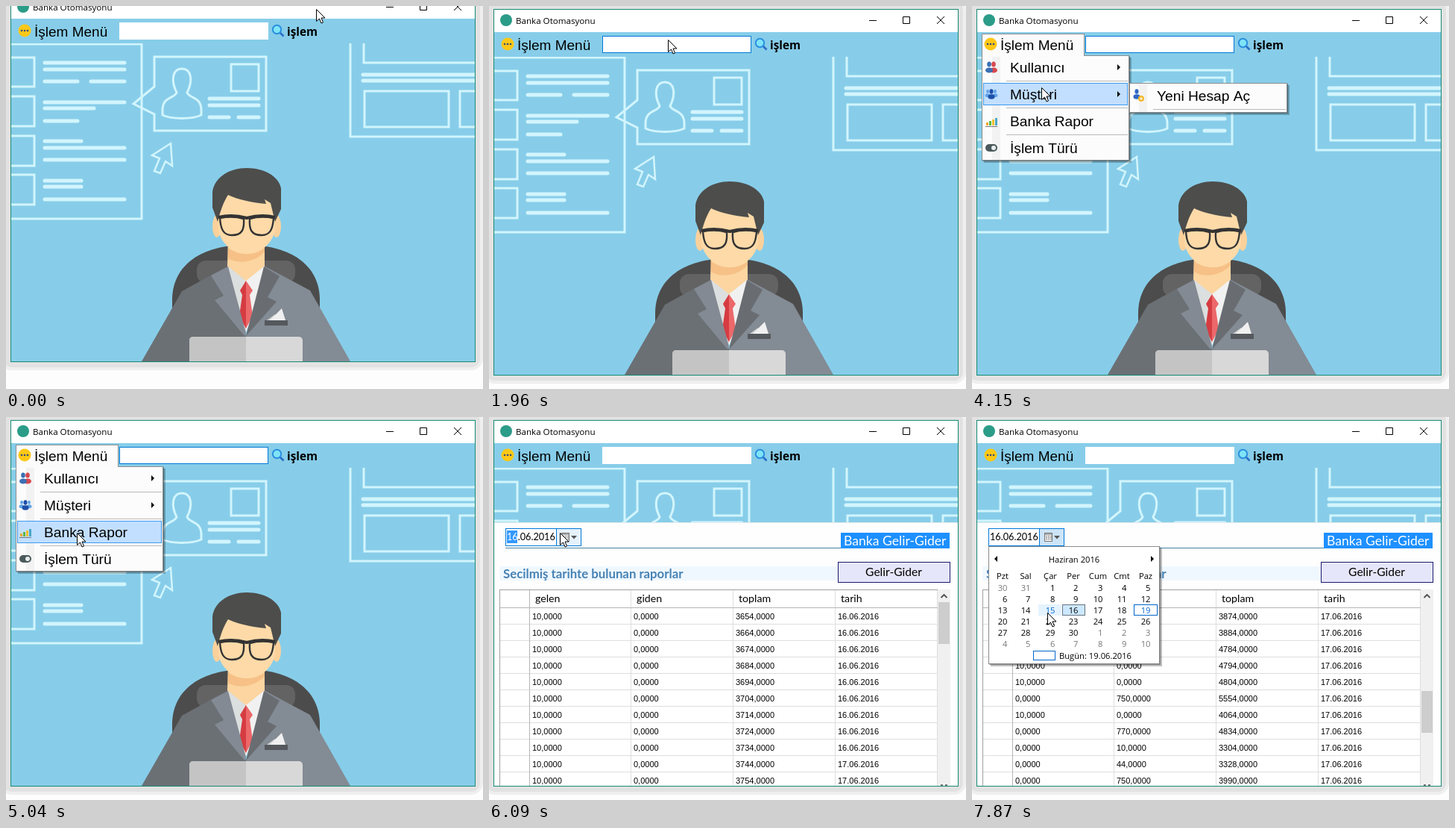
An HTML page with a canvas that plays this animation: 640 by 513 pixels, repeating every 8000 ms.

```html
<!DOCTYPE html>
<html lang="tr">
<head>
<meta charset="utf-8">
<title>Banka Otomasyonu</title>
<style>
html, body { margin: 0; width: 100%; height: 100%; overflow: hidden; background: #fdfdfd; }
canvas { display: block; }
</style>
</head>
<body>
<canvas id="stage" width="640" height="513"></canvas>
<script>
const c = document.getElementById('stage').getContext('2d');
const LOOP = 8000;
const MENU = '"Liberation Sans", sans-serif', UI = '"Open Sans", sans-serif', ROUND = 'Lato, sans-serif';
const SKY = '#87cde9', PALE = '#d2f5fd', BLUE = '#0078d7', NAVY = '#1c1838', ICE = '#aadcf5';

// Pointer stops: time, x, y
const POINTER = [
  [0, 416, 22], [950, 410, 26], [1100, 385, 35], [1250, 355, 42], [1400, 315, 44],
  [1690, 300, 43], [1830, 240, 45], [1970, 165, 48], [2100, 120, 50], [2240, 105, 50],
  [2520, 97, 62], [2660, 89, 73], [2810, 90, 73], [3620, 90, 82], [3750, 91, 98],
  [3870, 93, 109], [4580, 94, 125], [4730, 95, 155], [6520, 96, 162], [6650, 98, 176],
  [6780, 99, 180], [6920, 99, 182], [7040, 100, 170], [7170, 104, 160], [7440, 103, 177],
  [7600, 102, 205], [7740, 101, 235], [7870, 101, 262]
];
const WINDOW_Y = [[0, -18], [270, -10], [680, 0]];
const ACTIVE_ITEM = [[0, -1], [2660, 0], [3870, 1], [4730, 2]];
const SCROLL = [[0, 0], [6520, 6], [6650, 12], [6780, 17], [6920, 22]];

const at = (keys, t) => keys.reduce((found, key) => key[0] <= t ? key : found);
const during = (t, from, to) => t >= from && t < to;

function box(x, y, w, h, fill, stroke) {
  if (fill) { c.fillStyle = fill; c.fillRect(x, y, w, h); }
  if (stroke) { c.strokeStyle = stroke; c.lineWidth = 1; c.strokeRect(x + .5, y + .5, w - 1, h - 1); }
}
function shape(d, fill, stroke, width = 1) {
  const p = new Path2D(d);
  if (fill) { c.fillStyle = fill; c.fill(p); }
  if (stroke) { c.strokeStyle = stroke; c.lineWidth = width; c.stroke(p); }
}
function round(x, y, w, h, r, fill) {
  c.beginPath(); c.roundRect(x, y, w, h, r);
  c.fillStyle = fill; c.fill();
}
function oval(x, y, rx, ry, fill) {
  c.beginPath(); c.ellipse(x, y, rx, ry, 0, 0, 7);
  c.fillStyle = fill; c.fill();
}
function text(s, x, y, font, color = '#000', align = 'left') {
  c.font = font; c.fillStyle = color; c.textAlign = align;
  c.fillText(s, x, y);
}
function clipped(x, y, w, h, draw) {
  c.save(); c.beginPath(); c.rect(x, y, w, h); c.clip();
  draw(); c.restore();
}
function shadowed(x, y, w, h, fill, stroke) {
  box(x + 3, y + 3, w, h, 'rgba(0,0,0,.25)');
  box(x + 1, y + 1, w, h, 'rgba(0,0,0,.3)');
  box(x, y, w, h, fill, stroke);
}

function windowFrame() {
  round(-8, -10, 648, 516, 16, '#efefef');
  round(-4, -6, 640, 508, 12, '#e2e2e2');
  box(6, 4, 624, 491, SKY, '#168a74');
  box(7, 5, 622, 30, '#fff');
  oval(23, 19, 8, 8, '#2b9c88');
  text('Banka Otomasyonu', 36, 24, '11.6px ' + UI);
  shape('M510 19.5H520M555.5 14.5H564.5V23.5H555.5ZM601 14L611 24M611 14L601 24', null, '#000');
}

function bars(y, ...spans) {
  for (let i = 0; i < spans.length; i += 2) shape(`M${spans[i] + 2} ${y}H${spans[i + 1] - 2}`, null, PALE, 5);
}
function wireframes() {
  c.lineCap = 'round';
  shape('M7 69H182V303H7M7 87H38V126H7M7 139H38V179H7M7 192H38V232H7M7 244H38V284H7', null, PALE, 3);
  [94, 103, 147, 208, 224, 277].forEach(y => bars(y, 50, 161));
  bars(119, 50, 98, 112, 161);
  bars(155, 50, 120);
  bars(172, 50, 98);
  [199, 252, 260].forEach(y => bars(y, 50, 103));
  shape('M199 86H349V185H199V163L171 149L199 126ZM302 96H339V132H302Z', null, PALE, 3);
  shape('M229 134C221 118 223 102 236 102C249 102 251 118 243 134C246 142 261 139 262 156V164C250 170 222 170 210 164V156C211 139 226 142 229 134Z', null, PALE, 3);
  bars(142, 271, 341); bars(151, 271, 341); bars(167, 271, 301, 310, 341);
  shape('M221 202L196 218L206 222L199 239L207 242L214 226L223 232Z', null, PALE, 2.5);
  shape('M462 66V193H632M480 66V94H632M481 132H594V180H481ZM640 132H609V180H640', null, PALE, 3);
  bars(110, 477, 640); bars(118, 477, 640);
  c.lineCap = 'butt';
}

function banker() {
  shape('M223 430V410C224 365 262 338 322 338C382 338 420 365 421 410V430Z', '#4c4c4c');
  round(256, 359, 132, 30, 12, '#636363');
  shape('M182 494L236 400L298 366L322 460V494Z', '#6b7075');
  shape('M462 494L408 399L346 366L322 460V494Z', '#838b94');
  shape('M297 364L322 384V455L300 400Z', '#dcdfdf');
  shape('M347 364L322 384V455L344 400Z', '#f1f1f1');
  shape('M298 325H347V366L322 386L297 366Z', '#fcd5a0');
  shape('M298 342C312 353 334 353 347 342V347C334 362 310 364 298 356Z', '#f6c086');
  shape('M322 386L314 399L317 405L313 433L322 450Z', '#d53c42');
  shape('M322 386L331 399L327 405L331 433L322 450Z', '#ec686a');
  shape('M298 367L275 379L292 406L280 412L320 460L322 456Z', '#838a93');
  shape('M346 367L367 380L351 408L363 414L322 460Z', '#696d72');

  oval(283, 313, 6, 15, '#fbd19b'); oval(363, 313, 6, 15, '#fbd19b');
  shape('M285 285C285 260 360 260 361 285V315C360 336 340 350 323 350C306 350 286 336 285 315Z', '#fddaa8');
  shape('M277 267C280 247 300 235 323 235C346 235 366 246 369 262V290L361 307L355 282L347 277L349 283C328 281 311 277 298 271C291 282 288 292 284 307L277 288Z', '#4d4d4b');
  shape('M287 302C297 300 309 300 319 303C320 317 317 325 303 325C291 325 288 316 287 302ZM359 302C349 300 337 300 327 303C326 317 329 325 343 325C355 325 358 316 359 302Z', null, '#333', 2.4);
  shape('M285 301C298 298 312 299 323 302C334 299 348 298 361 301', null, '#333', 4);

  box(347, 439, 31, 7, '#55595e');
  shape('M350 439L361 431L364 439Z', '#d5d5d5');
  shape('M354 439L370 423L375 439Z', '#f0f0f0');
  round(246, 461, 152, 38, 5, '#d8d8d8');
  clipped(246, 461, 76, 34, () => round(246, 461, 152, 38, 5, '#c4c4c4'));
}

function toolbar(t) {
  const open = during(t, 2380, 5430);
  if (during(t, 2100, 2380)) box(13, 37, 138, 29, '#c2dfff', '#3399ff');
  if (open) box(13, 37, 138, 30, '#fbfbfb', '#8d8d8d');
  oval(25, 51, 8.5, 8.5, '#fdc816');
  [21, 25, 29].forEach(x => oval(x, 51, 1.3, 1.3, '#344b7a'));
  text('İşlem Menü', 38, 59, '19px ' + MENU);
  box(152, 40, 200, 23, '#fff', during(t, 1400, 5430) && BLUE);
  c.beginPath(); c.arc(363.5, 49.5, 5.7, 0, 7);
  c.fillStyle = '#7fe3f7'; c.fill();
  c.strokeStyle = '#2a8fdf'; c.lineWidth = 2; c.stroke();
  shape('M368 54L372.5 58.5', null, '#2a6fc9', 2.6);
  text('işlem', 377, 58, 'bold 15.3px ' + UI);
}

function person(x, y, color, size = 1) {
  oval(x, y - 4 * size, 2.8 * size, 3.6 * size, color);
  oval(x, y + 4 * size, 5 * size, 3.6 * size, color);
}
function caret(x, y, dir) {
  shape(`M${x} ${y - 4}L${x + 4 * dir} ${y}L${x} ${y + 4}Z`, '#000');
}
function menuItem(label, x, y) {
  text(label, x, y + 7, '19.2px ' + MENU);
}
function menu(t) {
  const active = at(ACTIVE_ITEM, t)[1];
  shadowed(13, 66, 198, 141, '#fcfcfc', '#8d8d8d');
  box(14, 65, 136, 3, '#fbfbfb');
  box(27, 68, 11, 138, '#f2f2f2');
  [100, 136, 172].forEach(y => box(46, y, 163, 1, '#b9b9b9'));
  if (active >= 0) box(15, 67 + active * 36, 194, 30, '#c2dfff', '#3c9af0');
  ['Kullanıcı', 'Müşteri', 'Banka Rapor', 'İşlem Türü'].forEach((s, i) => menuItem(s, 51, 82 + i * 36));
  caret(195, 82, 1); caret(195, 118, 1);

  person(29, 82, '#d6484e'); person(23, 82, '#3c6fb4');
  person(21, 117, '#62a4e8', .7); person(31, 117, '#62a4e8', .7); person(26, 118, '#1d4fa8', .9);
  ['#f0a830', '#58b848', '#f0c030', '#4aa8c8'].forEach((color, i) =>
    box(19 + i * 4, 156 - i * 2, 3, 4 + i * 2, color));
  box(18, 161, 16, 1, '#777');
  round(18, 185, 16, 10, 5, '#4b5a5c'); oval(29, 190, 3, 3, '#e8eded');

  if (during(t, 3090, 4150)) submenu('Yeni Ekle', 67, 170);
  if (during(t, 4150, 5040)) submenu('Yeni Hesap Aç', 103, 212);
}
function submenu(label, y, width) {
  shadowed(211, y, width, 40, '#fcfcfc', '#8d8d8d');
  box(224, y + 1, 11, 38, '#f2f2f2');
  box(243, y + 35, width - 34, 1, '#b9b9b9');
  menuItem(label, 248, y + 17);
  person(221, y + 15, '#2d67c4', .9);
  oval(227, y + 21, 4, 4, '#f4b82e');
  shape(`M225 ${y + 21}h4m-2 -2v4`, null, '#fff');
}

function formBackdrop() {
  shape('M112 178L142 154L160 166L175 155L225 175L210 186Z', '#b4e2f8');
  c.setLineDash([3, 2]);
  shape('M200 170Q222 170 238 178M304 240Q311 253 311 267V397', null, NAVY, 2);
  c.setLineDash([]);
  shape('M134 243V290Q136 309 149 320M467.5 155V288Q462 307 440 320M232 345V491M309 480V491', null, NAVY, 2);
  oval(134, 243, 4, 3, NAVY);
  c.strokeStyle = ICE; c.lineWidth = 4; c.setLineDash([7, 4]);
  c.beginPath(); c.arc(650, 225, 120, 0, 7); c.stroke();
  c.setLineDash([]); c.lineWidth = 1.5;
  c.beginPath(); c.arc(650, 225, 78, 0, 7); c.stroke();

  round(254, 380, 114, 82, 6, '#fbdf55');
  round(263, 399, 35, 14, 3, ICE);
  round(263, 419, 35, 34, 3, ICE);
  for (let y = 401; y < 456; y += 7) box(304, y, 56, 3, ICE);
  oval(309, 480, 5, 5, NAVY);
  round(524, 453, 120, 60, 20, ICE);
}
function userForm() {
  [[14, 155, 605, 21], [14, 231, 605, 260]].forEach(area => clipped(...area, formBackdrop));
  clipped(90, 231, 380, 200, () =>
    [216, 267, 319, 371].forEach(y => box(90, y, 379, 27, '#fff', '#5a5a5a')));
  ['kullanıcıadı', 'şifre', 'email adresi'].forEach((s, i) => text(s, 97, 260 + i * 51.5, '14.6px ' + ROUND));
  box(316, 417, 153, 34, '#fff', '#000');
  text('Ekle', 391, 438, '11px ' + ROUND, '#000', 'center');
}

function datePicker(t) {
  const hover = t < 6520 || t >= 7170, opened = t >= 7300;
  box(22, 149, 102, 24, '#fff', BLUE);
  if (hover) box(90, 149, 34, 24, opened ? '#cce4f7' : '#e5f1fb', BLUE);
  if (!opened) box(24, 152, 14, 17, '#3399ff');
  text('16', 24, 165, '12.7px ' + ROUND, opened ? '#000' : '#fff');
  text('.06.2016', 38.7, 165, '12.7px ' + ROUND);
  box(97, 155, 11, 12, '#eee', '#777');
  box(98, 156, 9, 2, '#aaa');
  for (let i = 0; i < 9; i++) box(99 + i % 3 * 3, 159 + (i / 3 | 0) * 2, 2, 1, '#888');
  shape('M110 159H118L114 163.5Z', '#555');
}

const LEDGER = [[10, 0, 3874], [10, 0, 3884], [900, 0, 4784], [10, 0, 4794], [10, 0, 4804], [0, 750, 5554],
  [10, 0, 4064], [0, 770, 4834], [0, 10, 3304], [0, 44, 3328], [0, 750, 3990]];
const ledgerRow = i => i >= 22 ? LEDGER[i - 22] || [10, 0, 4000 + i * 10] : [10, 0, 3654 + i * 10];

function ledger(t) {
  const columns = [54, 190, 327, 464], first = at(SCROLL, t)[1];
  box(14, 231, 605, 263, '#fff');
  clipped(14, 231, 588, 263, () => {
    for (let i = 0; i < 11; i++) {
      const row = ledgerRow(first + i), y = 271 + i * 22;
      columns.forEach((x, k) => {
        const value = k < 3 ? row[k] + ',0000' : (first + i < 9 ? '16' : '17') + '.06.2016';
        text(value, x + 4, y, '11px ' + MENU);
      });
      box(14, y + 6, 588, 1, '#dedede');
    }
    [...columns, 601].forEach(x => box(x, 232, 1, 262, '#dedede'));
    box(54, 232, 1, 262, '#b5b5b5');
    box(14, 231, 588, 1, '#a0a0a0'); box(14, 255, 588, 1, '#b5b5b5'); box(14, 231, 1, 263, '#a0a0a0');
    ['gelen', 'giden', 'toplam', 'tarih'].forEach((s, i) => text(s, columns[i] + 8, 248, '14.2px ' + ROUND));
  });
  box(602, 231, 17, 263, '#f0f0f0');
  box(603, 248 + first * 119 / 22, 15, 56, '#cdcdcd');
  shape('M606.5 242L610.5 238L614.5 242', null, '#505050', 1.8);
  box(606, 492, 3, 2, '#777'); box(612, 492, 3, 2, '#777');
}

function calendar(t) {
  const small = '11.2px ' + UI, centers = [41, 72, 105, 136, 169, 201, 233];
  shadowed(22, 173, 230, 158, '#fff', '#8a8a8a');
  text('Haziran 2016', 137, 195, small, t < 7600 ? '#0066cc' : '#000', 'center');
  caret(34, 190, -1); caret(240, 190, 1);
  ['Pzt', 'Sal', 'Çar', 'Per', 'Cum', 'Cmt', 'Paz'].forEach((s, i) => text(s, centers[i], 217, small, '#000', 'center'));
  const hovered = t >= 7870 ? 15 : t >= 7740 ? 8 : 0;
  for (let i = 0; i < 42; i++) {
    const june = i - 1, day = june < 1 ? june + 31 : june > 30 ? june - 30 : june;
    const x = centers[i % 7], y = 233 + (i / 7 | 0) * 15;
    if (june === hovered) box(x - 16, y - 12, 31, 15, '#e5f3ff');
    if (june === 16) {
      box(x - 15, y - 12, 31, 15, '#cce8ff');
      c.setLineDash([1, 1]); box(x - 15, y - 12, 31, 15, null, '#000'); c.setLineDash([]);
    }
    if (june === 19) box(x - 16, y - 12, 32, 15, null, '#0066cc');
    const color = june < 1 || june > 30 ? '#777' : june === 19 || june === hovered ? '#0066cc' : '#000';
    text(day, x + 6.5, y, small, color, 'right');
  }
  box(82, 313, 30, 13, '#fff', '#0066cc');
  text('Bugün: 19.06.2016', 117, 324, small);
}

function report(t) {
  const titled = t >= 5550;
  box(7, 141, 622, 353, '#fefefe');
  box(7, 141, 622, 1, '#dfe8ec');
  if (t < 5680) userForm();
  if (titled) {
    box(14, 142, 605, 58, '#fefefe');
    box(14, 200, 454, 19, '#f0f8ff');
    box(22, 175, 596, 1, '#4682a0');
    box(472, 155, 146, 21, '#1e90ff');
    text('Banka Gelir-Gider', 476, 172, '17.6px ' + ROUND, '#fff');
  }
  text('Secilmiş tarihte bulunan raporlar', 19, 216, 'bold 16.8px ' + ROUND, '#4682b4');
  box(468, 194, 151, 28, '#e6e6fa', '#191970');
  text('Gelir-Gider', 543, 213, '15.6px ' + ROUND, '#000', 'center');
  if (t >= 5680) ledger(t);
  datePicker(t);
  if (t >= 7440) calendar(t);
}

function pointer(t) {
  const [, x, y] = at(POINTER, t);
  c.save(); c.translate(x + .5, y + .5);
  shape('M0 0V16L4 12.5L6.5 18.5L9 17.5L6.5 11.5H11.5Z', '#fff', '#000');
  c.restore();
}

function render(now) {
  const t = now % LOOP;
  box(0, 0, 640, 513, '#fdfdfd');
  c.save();
  c.translate(0, at(WINDOW_Y, t)[1]);
  windowFrame();
  clipped(7, 68, 622, 426, () => { wireframes(); banker(); });
  toolbar(t);
  if (during(t, 2380, 5430)) menu(t);
  if (t >= 5430) report(t);
  pointer(t);
  c.restore();
}

const start = performance.now();
function tick() {
  render(performance.now() - start);
  requestAnimationFrame(tick);
}
tick();
</script>
</body>
</html>
```
